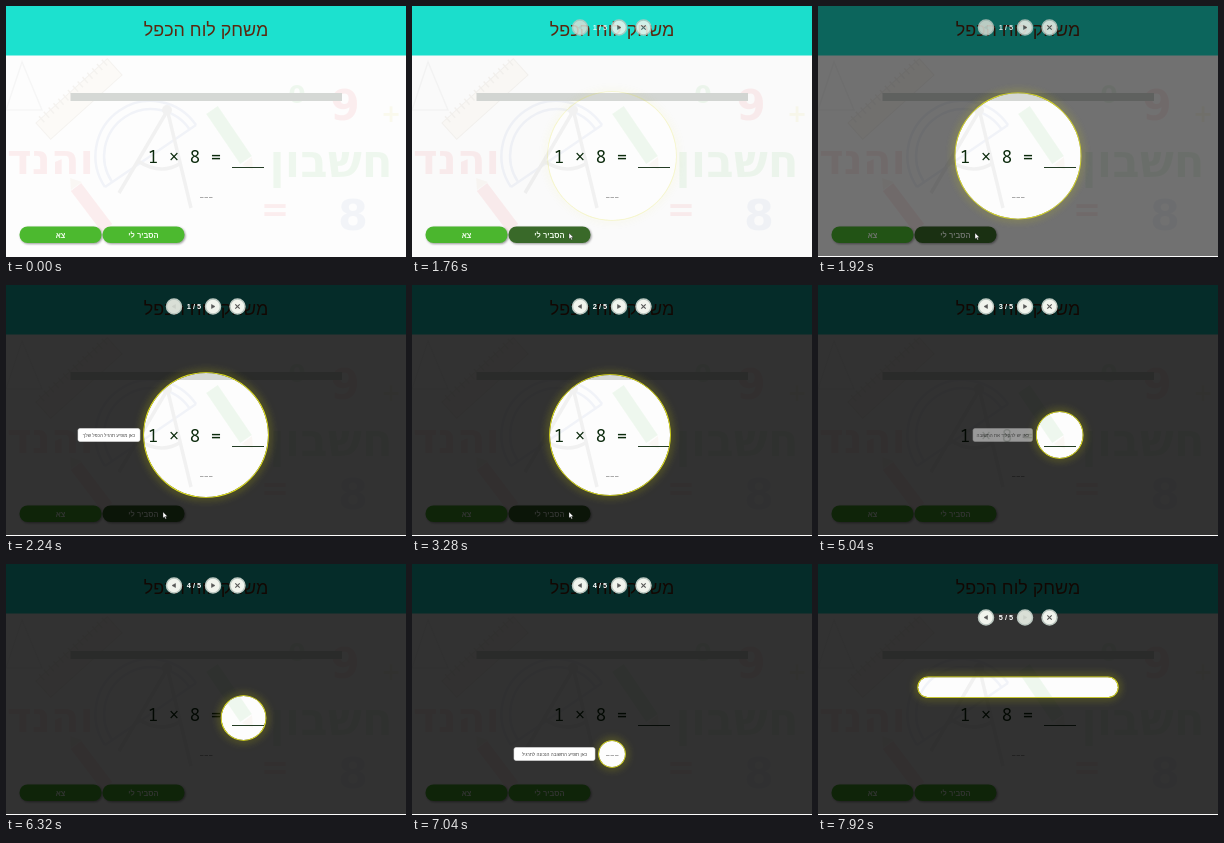
These frames come from a looping animation (400x251 px, 8000 ms). An HTML page:

```html
<!DOCTYPE html>
<html lang="he">
<head>
<meta charset="utf-8">
<style>
html, body { margin: 0; height: 100%; overflow: hidden; background: #fdfdfd; }
svg { display: block; width: 100vw; height: 100vh; }
text { text-anchor: middle; font-family: "Liberation Sans", Arial, sans-serif; }
.art text { font-family: "DejaVu Sans", sans-serif; font-weight: bold; }
.art path { fill: none; }
.mono { font-family: "Noto Sans Mono", monospace; font-size: 17.5px; text-anchor: start; white-space: pre; }
.label { font-size: 7.5px; font-weight: bold; fill: #f4fff0; }
.btn { filter: drop-shadow(1px 1.5px 1px #0006); }
#ring { fill: none; stroke: #e6e61c; stroke-width: 1.6; filter: drop-shadow(0 0 4px #d8d800a0) drop-shadow(0 0 4px #d8d80050); }
.ctl circle { fill: #f1f4ed; stroke: #bcc8c1; stroke-width: 1.5; }
.ctl path { fill: #555; stroke: #555; }
.off circle { fill: #d9dfd6; }
.off path { opacity: .1; }
</style>
</head>
<body>
<svg viewBox="0 0 400 251" preserveAspectRatio="none">
  <defs>
    <mask id="hole" maskUnits="userSpaceOnUse" x="0" y="0" width="400" height="251">
      <rect width="400" height="251" fill="#fff"/>
      <rect id="cut" fill="#000"/>
    </mask>
  </defs>

  <rect width="400" height="251" fill="#fdfdfd"/>
  <g class="art" opacity=".065">
    <text x="325" y="171" font-size="45" fill="#35b52c">חשבון</text>
    <text x="88" y="168" font-size="42" fill="#e8202c" style="direction:rtl;text-anchor:start">והנדסה</text>
    <text x="339" y="114" font-size="42" fill="#e8202c">9</text>
    <text x="347" y="224" font-size="43" fill="#6c86c0">8</text>
    <text x="269" y="215" font-size="34" fill="#e8202c">=</text>
    <text x="291" y="97" font-size="25" fill="#35b52c">0</text>
    <text x="385" y="116" font-size="24" fill="#d8d020">+</text>
    <path d="M0 104L16 56L36 104Z" stroke="#999" stroke-width="1.5"/>
    <g transform="translate(73 93) rotate(-42)">
      <rect x="-48" y="-11" width="96" height="22" fill="#f4dfb0" stroke="#8a6a40"/>
      <path d="M-42-10H44" stroke="#8a6a40" stroke-width="8" stroke-dasharray="1.5 5"/>
    </g>
    <path d="M99 181A52 52 0 0 1 190 119M106 176A44 44 0 0 1 184 124M99 181L190 119" stroke="#5570b8" stroke-width="2.5"/>
    <path d="M160 107L113 187M162 107L185 202M132 155Q155 170 175 157" stroke="#555" stroke-width="3.5"/>
    <circle cx="161" cy="104" r="5" fill="#555"/>
    <path d="M206 104L240 154" stroke="#35b52c" stroke-width="14"/>
    <path d="M236 159L247 164L246 151" style="fill:#d9b48a"/>
    <path d="M70 181L101 222" stroke="#e8202c" stroke-width="13"/>
    <path d="M65 184L64 172L76 176" style="fill:#d9b48a"/>
  </g>
  <rect width="400" height="49.5" fill="#1ce1cf"/>
  <text x="200" y="30" font-size="17.9" fill="#5c2810">משחק לוח הכפל</text>
  <rect x="64.5" y="87" width="271.5" height="8" fill="#d5d8d5"/>
  <text class="mono" x="141.7" y="156.6" fill="#0b2a0c">1 × 8 =</text>
  <path d="M226 161.5H258" stroke="#233c24"/>
  <path d="M194 191.5H206.5" stroke="#aaa" stroke-dasharray="3.5 1"/>
  <g class="btn">
    <rect x="13.5" y="220.5" width="82" height="16.5" rx="8" fill="#4cb92f"/>
    <rect id="explain" x="96.5" y="220.5" width="82" height="16.5" rx="8"/>
  </g>
  <text class="label" x="54.5" y="231.5">צא</text>
  <text class="label" x="137.5" y="231.5">הסביר לי</text>

  <rect id="shade" width="400" height="250" mask="url(#hole)"/>
  <g mask="url(#hole)"><rect id="ring"/></g>
  <g id="tip">
    <rect id="tipBox" y="143.5" height="13" rx="2" fill="#fff" stroke="#ddd" stroke-width=".6"/>
    <text id="tipText" font-size="4.6" fill="#444"></text>
  </g>
  <g id="bar">
    <g class="ctl" id="prev" transform="translate(168)"><circle r="7.5"/><path d="M-2 0L1.5-2V2Z" stroke-width=".5"/></g>
    <text id="count" x="188" y="2.7" font-size="7.4" font-weight="bold" fill="#fff"></text>
    <g class="ctl" id="next" transform="translate(207)"><circle r="7.5"/><path d="M2 0L-1.5-2V2Z" stroke-width=".5"/></g>
    <g class="ctl" transform="translate(231.5)"><circle r="7.5"/><path d="M-2.2-2.2L2.2 2.2M2.2-2.2L-2.2 2.2" stroke-width="1.1"/></g>
  </g>
  <path id="cursor" d="M0 0V6L1.4 4.8L2.4 7L3.4 6.5L2.5 4.4L4.3 4.3Z" fill="#fff" stroke="#222" stroke-width=".4"/>
</svg>
<script>
const LOOP = 8000, TICK = 80;
// at: start time, box: spotlight centre and size, tip: left, right, middle, text
const steps = [
  { at: 1680, box: [200, 150, 124, 124], tip: [72, 134, 150, "כאן מופיע תרגיל הכפל שלך"] },
  { at: 3280, box: [180, 150, 84, 84], tip: [101, 134, 150, "זה התרגיל"] },
  { at: 4640, box: [241.7, 150, 46, 46], tip: [155, 214.5, 150, "כאן יש להקליד את התשובה"] },
  { at: 6320, box: [200, 190, 26, 26], tip: [102, 183, 190, "כאן תופיע התשובה הנכונה לתרגיל"] },
  { at: 7840, box: [200, 90, 286, 17] },
];
const $ = id => document.getElementById(id);
const set = (id, attrs) => {
  for (const k in attrs) $(id).setAttribute(k, attrs[k]);
};
const clamp = u => Math.min(1, Math.max(0, u));
const swing = u => (1 - Math.cos(Math.PI * clamp(u))) / 2;
const quad = u => (u = clamp(u), u < .5 ? 2 * u * u : 1 - 2 * (1 - u) ** 2);
const mix = (a, b, p) => a + (b - a) * p;

function drawPointer(t) {
  const p = 1 - (1 - clamp((t - 560) / 640)) ** 2;
  const x = mix(276, 157, p), y = mix(212, 227, p);
  const shown = t >= 560 && t < 3360;
  set("cursor", { transform: `translate(${x} ${y})`, opacity: +shown });
  set("explain", { fill: shown && x < 178 ? "#3a6b2a" : "#4cb92f" });
}

function drawGuide(t) {
  const n = steps.filter(s => t >= s.at).length;
  const i = Math.max(0, n - 1), { at, box, tip } = steps[i];
  const fade = swing((t - 1740) / 290);
  const from = i ? steps[i - 1].box : box;
  const move = quad((t - at + 48) / 216);
  let [cx, cy, w, h] = box.map((v, k) => mix(from[k], v, move));
  const grow = 4 * (1 - fade);
  w += grow;
  h += grow;
  const shape = { x: cx - w / 2, y: cy - h / 2, width: w, height: h, rx: Math.min(w, h) / 2 };
  set("cut", shape);
  set("ring", { ...shape, opacity: fade ** .35 });
  set("shade", { opacity: .8 * fade });

  const barY = n === 5 ? 53.5 : 21.5;
  set("bar", { transform: `translate(0 ${barY})`, opacity: fade ? Math.max(.85, fade) : 0 });
  $("count").textContent = `${i + 1} / 5`;
  $("prev").classList.toggle("off", i === 0);
  $("next").classList.toggle("off", i === 4);

  set("tip", { opacity: tip ? swing((t - at - 250) / 300) : 0 });
  if (!tip) return;
  const [left, right, mid, words] = tip;
  set("tipBox", { x: left, y: mid - 6.5, width: right - left });
  set("tipText", { x: (left + right) / 2, y: mid + 1.6 });
  $("tipText").textContent = words;
}

function frame(now) {
  const t = Math.floor(now % LOOP / TICK) * TICK;
  drawPointer(t);
  drawGuide(t);
  requestAnimationFrame(frame);
}
frame(0);
</script>
</body>
</html>
```
